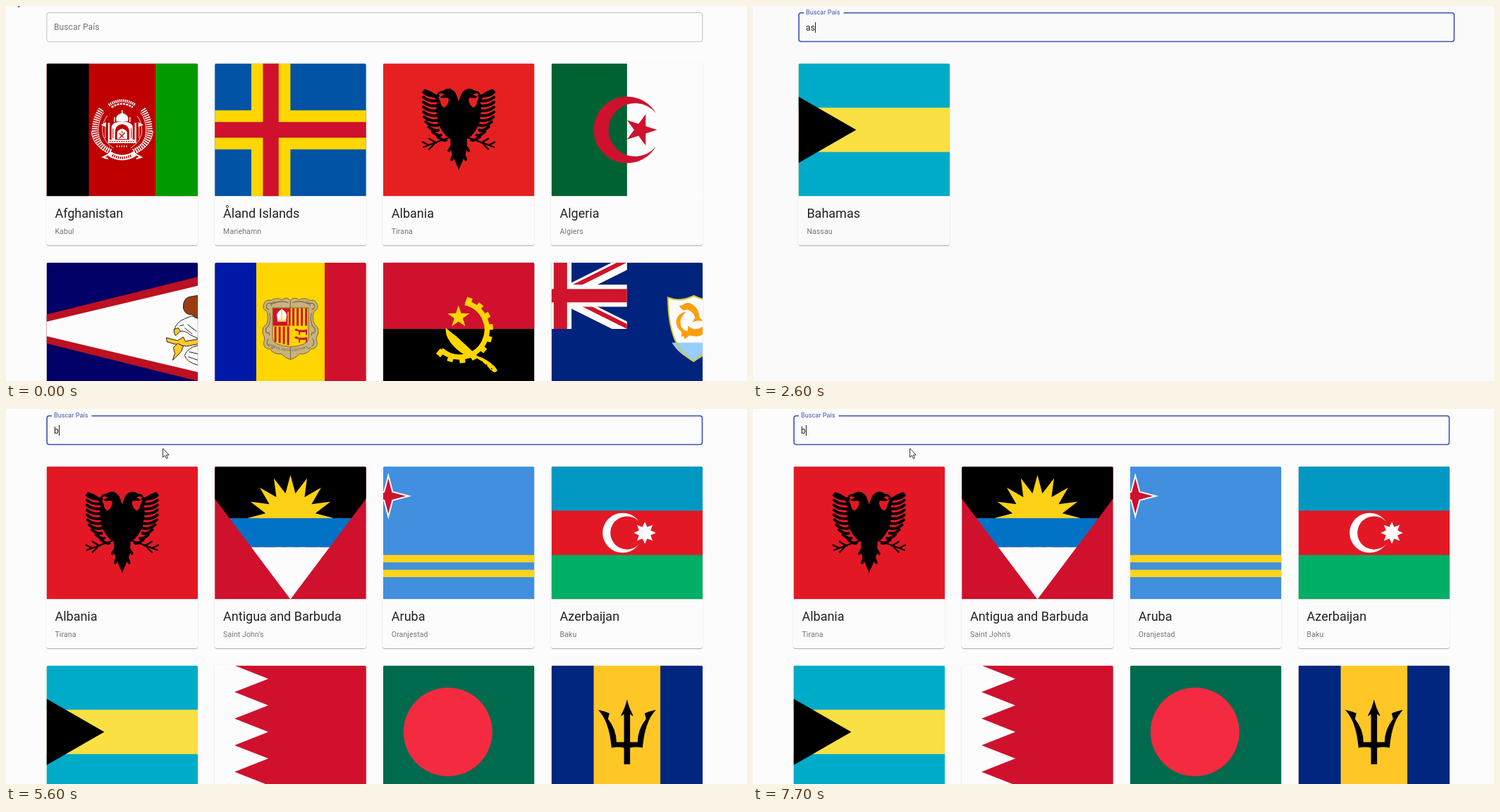
Animation, 1051 px wide and 533 px high, one loop 8000 ms. Source, as an HTML page:

```html
<!DOCTYPE html>
<html lang="es">
<head>
<meta charset="utf-8">
<title>Buscar País</title>
<style>
html, body { margin: 0; width: 100%; height: 100%; overflow: hidden; background: #fafafa; }
#stage { position: relative; width: 1051px; height: 533px; overflow: hidden; font-family: Roboto, sans-serif; }
#page, .layer { position: absolute; left: 0; top: 0; }
.card {
  position: absolute; width: 215px; height: 259px; border-radius: 3px;
  box-shadow: 0 1.5px .75px -.75px rgba(0,0,0,.2), 0 .75px .75px rgba(0,0,0,.14), 0 .75px 2.25px rgba(0,0,0,.12);
}
svg { display: block; overflow: visible; }
.name { font-size: 18px; fill: rgba(0,0,0,.87); }
.city { font-size: 10.5px; letter-spacing: .01071em; fill: rgba(0,0,0,.54); }
#label, #typed { font-size: 12px; letter-spacing: .00938em; }
</style>
</head>
<body>
<div id="stage">
  <div id="page">
    <div id="lists"></div>
    <svg class="layer" width="1051" height="533">
      <clipPath id="photo"><path d="M0 189V3Q0 0 3 0H211.7Q214.7 0 214.7 3V189Z"/></clipPath>
      <path id="border" fill="none"/>
      <text id="label">Buscar País</text>
      <text id="typed" x="68" y="34.8" fill="rgba(0,0,0,.87)"></text>
      <rect id="caret" y="23" width="1" height="15" fill="#222"/>
    </svg>
  </div>
  <svg class="layer" width="1051" height="533">
    <path id="arrow" d="M.5 0V12.6L3.4 10L5.5 14.6L7.4 13.7L5.4 9.3H9.2Z" fill="#fff" stroke="#222" stroke-width=".9"/>
    <path id="beam" d="M-3 -7.5H-1Q0 -7.5 0 -6.5V6.5Q0 7.5 -1 7.5H-3M3 -7.5H1Q0 -7.5 0 -6.5M0 6.5Q0 7.5 1 7.5H3" fill="none" stroke="#222"/>
  </svg>
</div>
<script>
const $ = id => document.getElementById(id);
const W = '#fcfcfc', RED = '#cf112e', GOLD = '#ffd600';
const FW = 214.7, FH = 189, CX = FW / 2, CY = FH / 2;

const rect = (x, y, w, h, fill) => `<rect x="${x}" y="${y}" width="${w}" height="${h}" fill="${fill}"/>`;
const path = (d, fill, more = '') => `<path d="${d}" fill="${fill}" ${more}/>`;
const line = (d, color, w, more = '') => path(d, 'none', `stroke="${color}" stroke-width="${w}" ${more}`);
const circle = (x, y, r, fill) => `<circle cx="${x}" cy="${y}" r="${r}" fill="${fill}"/>`;
const group = (t, s) => `<g transform="${t}">${s}</g>`;
const twin = s => s + group('scale(-1 1)', s);
const mirror = s => group(`translate(${CX} 0)`, twin(s));
const unit = s => group(`translate(${CX} ${CY}) scale(${FH / 480}) translate(-320 -240)`, s);
const field = fill => rect(0, 0, FW, FH, fill);
const columns = (a, b, c, half = FH / 4) => field(b) + rect(0, 0, CX - half, FH, a) + rect(CX + half, 0, CX - half, FH, c);
const rows = (a, b, c) => field(b) + rect(0, 0, FW, FH / 3, a) + rect(0, FH * 2 / 3, FW, FH / 3, c);

function star(x, y, n, outer, inner, fill, more) {
  let d = '';
  for (let i = 0; i < n * 2; i++) {
    const a = i * Math.PI / n - Math.PI / 2, r = i % 2 ? inner : outer;
    d += (i ? 'L' : 'M') + (x + r * Math.cos(a)).toFixed(2) + ' ' + (y + r * Math.sin(a)).toFixed(2);
  }
  return path(d + 'Z', fill, more);
}

function afghanistan() {
  const red = '#be0000';
  const half = line('M-16 31Q-37 22-39 2Q-39-16-29-30', W, 8, 'stroke-dasharray="1.7 1.5"')
    + line('M-13 36Q-42 25-43.5 2', W, 1) + line('M-17 29Q-33 20-34 2Q-34-14-26-25', W, .9)
    + line('M-12 26Q-27 17-28 2Q-28-12-21-20', W, .8)
    + rect(-20, -10, 2.2, 24, W) + line('M-24-10V12', W, .8) + path('M-23-11L-30-7L-23-4Z', W)
    + line('M-16 33L-27 39L-20 41', W, 2);
  const mosque = path('M-15 14V-5Q-14-11 0-12Q14-11 15-5V14Z', W)
    + path('M-8-12Q-11-21 0-24Q11-21 8-12Z', W) + line('M0-23V-28M-11-11V-18M11-11V-18', W, 1.4)
    + path('M-10 14V1Q-9-7 0-8Q9-7 10 1V14Z', red)
    + path('M-7 13V3Q0-6 7 3V13Z', W) + line('M-4 12L4 4M-4 5L2 11M0 2V5', red, 1.2)
    + line('M-13 12V-2M13 12V-2', red, 1) + rect(-20, 14, 40, 5, W)
    + line('M-18 16.5H18', red, 1.2, 'stroke-dasharray="2 1.3"');
  const script = line('M-19-35Q0-48 19-35', W, 4, 'stroke-dasharray="1.6 1.1"')
    + line('M-15-32Q0-42 15-32', W, 2.6, 'stroke-dasharray="3 1.3"')
    + line('M-8 23.5H8', W, 2.4, 'stroke-dasharray="1.2 2.2"');
  const scroll = line('M-18 34Q0 45 18 34', W, 7.5) + line('M-14 36Q0 43.5 14 36', red, 3.4, 'stroke-dasharray="1.5 1.4"');
  return columns('#000', red, '#009a00') + group(`translate(${CX} ${CY})`, twin(half) + mosque + script + scroll);
}

function aland() {
  const cross = (x, y, w, f) => rect(x, 0, w, FH, f) + rect(0, y, FW, w, f);
  return field('#0053a5') + cross(51.8, 66.8, 55.5, GOLD) + cross(68.3, 83.4, 22.3, RED);
}

function albania(bg) {
  const round = 'stroke-linecap="round"';
  let half = path('M-.5 56L2 48Q5 38 13 36Q19 35.5 22 39Q29 38 31 45L25 42.5L20 44L27 48L22 49.5Q14 47 14 52Q15 60 21 63Q26 60 26 54L30 48L32 66L29 86Q24 97 17 104L12 106L11 124L8 133L-.5 152Z', '#000');
  for (let i = 0; i < 10; i++) {
    const y = 41 + i * 7, x = 50 - Math.max(0, i - 4) ** 2 * .8;
    half += line(`M${Math.min(29, x - 12)} ${y + 5}Q${x - 8} ${y + 7} ${x} ${y}`, '#000', 4, round);
  }
  half += line('M30 50Q36 43 48 39', '#000', 4.5, round)
    + line('M9 104L26 110L50 119M32 113L42 107M35 115L42 122M43 116L51 112', '#000', 2.3, round)
    + line('M6 112L14 124M5 124L10 137', '#000', 4, round);
  return field(bg) + mirror(half);
}

const algeria = () => field(W) + rect(0, 0, CX, FH, '#006233') + unit(path(
  'M424 180a120 120 0 1 0 0 120 96 96 0 1 1 0-120zm4 60-108-35.2 67.2 92V183.2l-67.2 92z', RED));

function samoa() {
  const out = 'stroke="#222" stroke-width="1"', gold = '#ffc72c';
  return field('#000066') + path('M0 74L215 20.3V168.7L0 115Z', '#bd1021')
    + path('M0 84.3L215 33V156L0 104.7Z', W)
    + path('M194 65Q193 49 207 48L215 47V80L206 74Q197 75 194 65Z', '#9b3d12', out)
    + path('M181 96Q185 84 196 80L206 76L215 80V108L204 103Q196 96 189 98Z', W, out)
    + path('M181 95L187 93L190 98L183 104Q180 100 181 95Z', gold, out)
    + line('M189 90L195 89M200 88L213 98M196 93L207 102', '#222', 1)
    + path('M170 107L186 111L194 106L197 112L215 109V116L199 119L191 118L184 124L186 117L171 113Z', gold, out)
    + path('M180 121L186 115L194 119L191 127L179 139L182 129Z', gold, out)
    + path('M215 118Q200 121 196 132Q199 142 215 146Z', W, out)
    + line('M202 127L215 130M201 134L215 139', '#222', 1);
}

function andorra() {
  const tan = '#c7b37f', edge = '#7c643b';
  const frame = path('M0 54Q5 48 12 53Q20 49 28 54Q36 52 38 60Q40 67 34 69Q30 78 34 88Q41 92 39 102Q35 107 38 114Q38 123 29 123Q24 131 13 130Q6 137 0 138Z', tan, `stroke="${edge}"`)
    + line('M3 57Q15 53 26 59Q32 56 34 61Q35 66 30 67M30 72Q27 80 31 90Q37 94 34 100Q29 99 30 104M31 108Q36 115 30 119', edge, 1.1)
    + line('M22 55Q29 57 27 62M28 121Q25 124 22 119', edge, 1);
  let s = mirror(frame) + path('M82 64.5H133V108Q132 118 107.5 120Q83 118 82 108Z', GOLD, `stroke="${edge}"`);
  s += rect(82.5, 65, 25, 25, RED);
  for (let i = 0; i < 4; i++) s += rect(110 + i * 6, 65, 3, 25, RED) + rect(84.5 + i * 6, 91, 3, 22 + i * 1.5, RED);
  s += path('M89 84L88 74Q90 69 95 66Q100 69 102 74L101 84Z', W) + line('M95 67V84M89 82H101', GOLD, 1.3)
    + line('M104 70V89', GOLD, 1.4);
  for (const y of [95, 106])
    s += path(`M113 ${y}l3-1 3 2h8l4-1v8h-2v-4h-8v4h-2v-5l-5-1z`, RED);
  return columns('#0018a8', GOLD, RED, 48.5) + s
    + `<defs><path id="motto" d="M76 118Q107 135 139 118"/></defs><text font-size="5.2" fill="${edge}"><textPath href="#motto">VIRTVS VNITA FORTIOR</textPath></text>`;
}

function angola() {
  let teeth = '';
  for (let a = -72; a <= 130; a += 22.4) teeth += group(`rotate(${a})`, rect(38, -4, 9.5, 8, GOLD));
  return field('#000') + rect(0, 0, FW, CY, RED)
    + group('translate(108.5 95.5)', line('M8-38.2A39 39 0 1 1-26 29', GOLD, 7.5) + teeth)
    + star(107, 77.5, 5, 16.5, 6.4, GOLD)
    + path('M89 93Q87 107 103 122Q114 132 127 137L133 136Q144 142 153 153Q160 159 162 153Q157 145 147 139Q141 135 134 133L104 105Q96 99 89 93Z', GOLD)
    + [140, 147, 154].map((x, i) => circle(x, 141 + i * 5, .9, '#000')).join('');
}

function anguilla() {
  const red = '#cf142b', fish = '#ff9d0d', mid = CY / 2, x0 = CX - CY;
  const cross = (w, f) => rect(x0 - w / 2, 0, w, CY, f) + rect(0, mid - w / 2, CX, w, f);
  const arm = path(`M0 0L${CY} ${-mid}H${CY - 14}L0 -7Z`, red) + path(`M0 0L${CY} ${mid}V${mid - 7}L14 0Z`, red);
  const jack = `<svg width="${CX}" height="${CY}" style="overflow:hidden">`
    + group(`translate(${x0} ${mid})`, line(`M${-CY} ${-mid}L${CY} ${mid}M${-CY} ${mid}L${CY} ${-mid}`, W, 18.9)
      + arm + group('rotate(180)', arm))
    + cross(CY / 3, W) + cross(CY / 5, red) + '</svg>';
  const shield = 'M165.5 50Q183 57 202 47.5Q221 57 239 50Q242 113 202 140.5Q166 122 165.5 50Z';
  return field('#00247d') + jack + path(shield, W)
    + path('M171 114H233Q225 130 202 140.5Q180 130 171 114Z', '#99ccff')
    + line(shield, '#d8c53a', 2)
    + path('M181 62L187 60Q195 54 204 63Q210 69 210 78L215 83L206 83L200 85L204 78Q201 70 193 67L187 68Z', fish)
    + path('M191 70L187 75Q181 82 184 91Q187 97 195 98L200 105L191 102L184 106L185 99Q176 92 177 82Q180 72 191 70Z', fish)
    + path('M194 90Q203 99 215 91V102Q207 108 197 103L189 109L187 103L193 100Z', fish);
}

const antigua = () => field(RED)
  + `<clipPath id="vee"><path d="M${CX - FH * .75} 0H${CX + FH * .75}L${CX} ${FH}Z"/></clipPath><g clip-path="url(#vee)">`
  + rect(0, 0, FW, 74, '#000') + star(CX, 73.8, 16, 61.5, 36, '#fcd116')
  + rect(0, 73.7, FW, 41.3, '#0072c6') + rect(0, 115, FW, 74, W) + '</g>';

const aruba = () => field('#418fde') + rect(0, 126, FW, 10.5, '#ffd41a') + rect(0, 147, FW, 10.5, '#ffd41a')
  + star(7.5, 42.3, 4, 29, 8.5, RED, `stroke="${W}" stroke-width="2"`);

const azerbaijan = () => rows('#0098c3', '#e31825', '#00ae65') + unit(circle(304, 240, 72, W)
  + circle(320, 240, 60, '#e31825') + star(384, 240, 8, 40, 22.5, W));

const bahamas = () => rows('#00abc9', '#fae042', '#00abc9') + path(`M0 ${FH / 4}L82 ${CY}L0 ${FH * .75}Z`, '#000');

function bahrain() {
  let d = 'M215 0H28';
  for (let i = 0; i < 5; i++) d += `L76 ${(i + .5) * FH / 5}L28 ${(i + 1) * FH / 5}`;
  return field(W) + path(d + 'H215Z', RED);
}

const bangladesh = () => field('#006a4e') + circle(92, CY, 63, '#f42a41');

const barbados = () => columns('#00267f', '#ffc726', '#00267f') + mirror(
  path('M-.3 49L0 49Q3 61 9 72Q6 71 4.3 69V109H15Q15 91 27 76L25 68Q32 65 41 63Q33 72 29 83Q24 96 22 117Q13 115 4.3 117V140.5H-.3Z', '#000'));

// Cards sit on fractional positions: the box takes whole pixels, the content the rest.
function card([flag, name, city], i) {
  const x = 57.4 + 238.7 * (i % 4), y = 81.5 + 283 * (i >> 2), left = Math.floor(x), top = Math.floor(y);
  return `<div class="card" style="left:${left}px;top:${top}px"><svg width="215" height="259">`
    + group(`translate(${(x - left).toFixed(2)} ${y - top})`, `<g clip-path="url(#photo)">${flag}</g>`
      + `<text class="name" x="12" y="219.2">${name}</text><text class="city" x="12" y="242.3">${city}</text>`)
    + '</svg></div>';
}

const bahamasCard = [bahamas(), 'Bahamas', 'Nassau'], bahrainCard = [bahrain(), 'Bahrain', 'Manama'];
const lists = {
  all: [
    [afghanistan(), 'Afghanistan', 'Kabul'], [aland(), 'Åland Islands', 'Mariehamn'],
    [albania('#e62021'), 'Albania', 'Tirana'], [algeria(), 'Algeria', 'Algiers'],
    [samoa(), 'American Samoa', 'Pago Pago'], [andorra(), 'Andorra', 'Andorra la Vella'],
    [angola(), 'Angola', 'Luanda'], [anguilla(), 'Anguilla', 'The Valley']],
  b: [
    [albania('#e41825'), 'Albania', 'Tirana'], [antigua(), 'Antigua and Barbuda', "Saint John's"],
    [aruba(), 'Aruba', 'Oranjestad'], [azerbaijan(), 'Azerbaijan', 'Baku'],
    bahamasCard, bahrainCard,
    [bangladesh(), 'Bangladesh', 'Dhaka'], [barbados(), 'Barbados', 'Bridgetown']],
  as: [bahamasCard],
  bah: [bahamasCard, bahrainCard]
};
$('lists').innerHTML = Object.entries(lists).map(([k, v]) =>
  `<div class="layer" id="list-${k}">${v.map(card).join('')}</div>`).join('');

const viewOf = { '': 'all', a: 'all', as: 'as', b: 'b', ba: 'b', bah: 'bah' };
const typing = [[0, ''], [2400, 'a'], [2600, 'as'], [4900, 'a'], [5400, ''], [5600, 'b'], [6100, 'ba'], [6700, 'bah'], [7300, 'ba'], [7600, 'b']];
const caretOn = [[1900, 3200], [3700, 4200], [4700, 5200], [5600, 6600], [6700, 7200], [7700, 8000]];
const track = [[300, 12, -13], [600, 45, 4], [900, 100, 36], [1200, 72, 30.5], [3100, 72, 30.5], [3300, 110, 62],
  [3600, 250, 240], [3800, 320, 337], [4000, 299, 306], [4300, 222, 56]];

function pointerAt(t) {
  const i = track.findIndex(k => k[0] > t);
  if (i === 0) return track[0].slice(1);
  if (i < 0) return track[track.length - 1].slice(1);
  const [t0, x0, y0] = track[i - 1], [t1, x1, y1] = track[i], p = (t - t0) / (t1 - t0);
  return [x0 + (x1 - x0) * p, y0 + (y1 - y0) * p];
}

const show = (el, on) => el.style.display = on ? '' : 'none';

function draw(time) {
  const t = Math.floor(time / 100) * 100;
  const text = typing.filter(k => k[0] <= t).pop()[1];
  const view = viewOf[text], wide = view === 'as' || view === 'bah';
  $('stage').style.background = wide ? '#fafafa' : W;
  $('page').style.left = (wide ? 7 : 0) + 'px';
  for (const k in lists) show($('list-' + k), k === view);

  const [x, y] = pointerAt(t);
  const over = y > 9 && y < 51 && x > 57;
  const hidden = t >= 2400 && t < 3200;
  show($('arrow'), !over && !hidden);
  show($('beam'), over && !hidden);
  $('arrow').setAttribute('transform', `translate(${x} ${y})`);
  $('beam').setAttribute('transform', `translate(${Math.round(x) + .5} ${y})`);

  const p = Math.min(1, Math.max(0, (t - 1850) / 200));
  const e = 1 - (1 - p) ** 3, focus = t >= 1900;
  const w = focus ? 1.6 : 1, l = 57.3 + w / 2, r = 988.3 - w / 2, a = 9 + w / 2, b = 51.3 - w / 2;
  const border = $('border');
  border.setAttribute('d', `M${65 + 56.5 * e} ${a}H${r - 3}Q${r} ${a} ${r} ${a + 3}V${b - 3}Q${r} ${b} ${r - 3} ${b}H${l + 3}Q${l} ${b} ${l} ${b - 3}V${a + 3}Q${l} ${a} ${l + 3} ${a}H65`);
  border.setAttribute('stroke', focus ? '#3f51b5' : over ? '#222' : 'rgba(0,0,0,.23)');
  border.setAttribute('stroke-width', w);

  const mix = (from, to) => Math.round(from + (to - from) * e);
  $('label').setAttribute('transform', `translate(68 ${34.2 - 22 * e}) scale(${1 - .25 * e})`);
  $('label').setAttribute('fill', `rgb(${mix(117, 63)},${mix(117, 81)},${mix(117, 181)})`);

  const typed = $('typed');
  typed.textContent = text;
  const end = text ? typed.getComputedTextLength() : 0;
  $('caret').setAttribute('x', Math.floor(68.2 + end));
  show($('caret'), caretOn.some(([from, to]) => t >= from && t < to));
}

const start = performance.now();
function tick() {
  draw((performance.now() - start) % 8000);
  requestAnimationFrame(tick);
}
tick();
</script>
</body>
</html>
```
